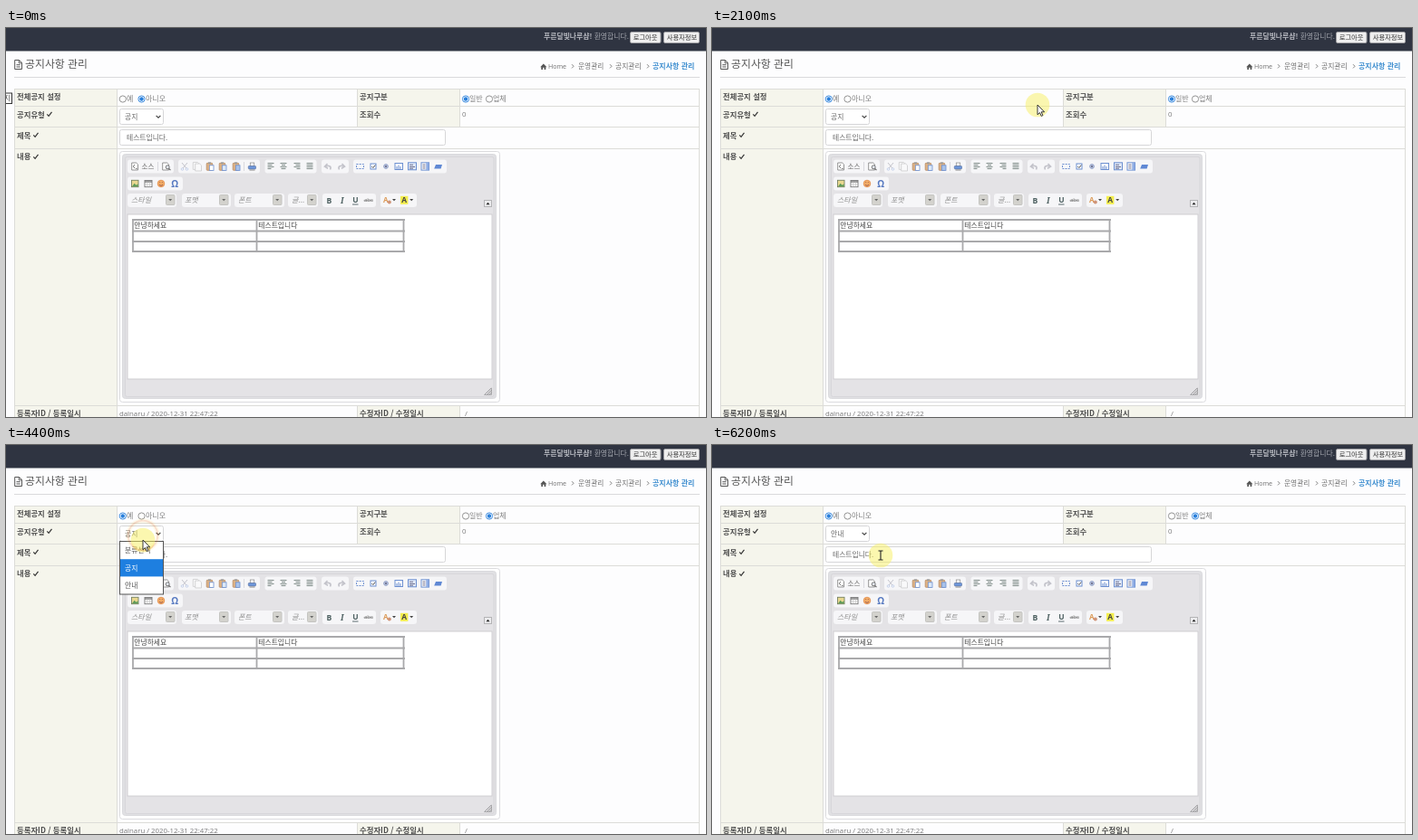
Animation, 772 px wide and 430 px high, one loop 8 s. Source, as an HTML page:

```html
<!DOCTYPE html>
<html lang="ko">
<head>
<meta charset="utf-8">
<style>
html, body { margin: 0; width: 100%; height: 100%; overflow: hidden; background: #fdfdfe; }
svg { display: block; width: 772px; height: 430px; font-family: "Noto Sans CJK KR", "Noto Sans CJK", sans-serif; }
.latin { font-family: "Open Sans", "Noto Sans CJK KR", sans-serif; }
</style>
</head>
<body>
<svg id="stage" viewBox="0 0 772 430"></svg>
<script>
const LOOP = 8000;
let out = '';

const rect = (x, y, w, h, fill = 'none', stroke = 'none', r = 0, sw = 1) =>
  out += `<rect x="${x}" y="${y}" width="${w}" height="${h}" rx="${r}" fill="${fill}" stroke="${stroke}" stroke-width="${sw}"/>`;
const path = (d, stroke, w = 1, fill = 'none', extra = '') =>
  out += `<path d="${d}" stroke="${stroke}" stroke-width="${w}" fill="${fill}" ${extra}/>`;
const circle = (x, y, r, fill, stroke = 'none', w = 1, extra = '') =>
  out += `<circle cx="${x}" cy="${y}" r="${r}" fill="${fill}" stroke="${stroke}" stroke-width="${w}" ${extra}/>`;
// y is the vertical middle of the glyphs
const text = (x, y, size, str, fill = '#707070', extra = '') =>
  out += `<text x="${x}" y="${y + size * 0.38}" font-size="${size}" fill="${fill}" ${extra}>${str}</text>`;
const BOLD = 'font-weight="700"', LATIN = 'class="latin"';
const group = (attrs, draw) => { out += `<g ${attrs}>`; draw(); out += '</g>'; };

function header() {
  rect(0, 0, 772, 25.5, '#2f3441');
  text(593, 9.5, 7.85, '<tspan font-weight="700" fill="#b9bbc2">푸른달빛나루샵!</tspan> 환영합니다.', '#a2a5ad');
  for (const [x, w, s] of [[688.5, 33.5, '로그아웃'], [725.5, 39, '사용자정보']]) {
    rect(x, 4.5, w, 12, '#efefef', '#a0a0a4', 1.5);
    text(x + 3.2, 10.5, 7.3, s, '#333');
  }
  path('M9.7 35.5H14.5L17.5 38.5V45.5H9.7ZM14.3 35.7V38.8H17.3M11.5 40.7H15.7M11.5 43H15.7', '#555', 1);
  text(21, 39.3, 11.9, '공지사항 관리', '#555');
  path('M9 54.5H765', '#dadadc');
  path('M589.2 43.2L592.8 39.6 596.4 43.2H595.3V46H593.6V43.8H592V46H590.3V43.2Z', 'none', 0, '#555');
  text(598, 42.3, 7.1, 'Home', '#707070', LATIN);
  text(631, 42.3, 7.7, '운영관리');
  text(672, 42.3, 7.8, '공지관리');
  text(713, 42.2, 8, '공지사항 관리', '#3f8fd0', BOLD);
  for (const x of [624, 666, 707]) path(`M${x} 40.2l2 2.1-2 2.1`, '#777', 0.9);
}

function form() {
  const label = '#f5f5ec';
  rect(9.5, 67, 113, 363, label);
  rect(388, 67, 113, 42, label);
  rect(388, 417.5, 113, 13, label);
  path('M9 67.5H765M9 86.5H765M9 109.5H765M9 133.5H765M9 417.5H765M9.5 67V430M122.5 67V430' +
    'M764.5 67V430M387.5 67V109M500.5 67V109M387.5 417V430M500.5 417V430', '#dcdcd8');
  const labels = [[12, 76, '전체공지 설정'], [12, 95.5, '공지유형'], [12, 118.5, '제목'], [12, 142, '내용'],
    [12, 426, '등록자ID / 등록일시'], [390, 76, '공지구분'], [390, 95.5, '조회수'], [390, 426, '수정자ID / 수정일시']];
  for (const [x, y, s] of labels) text(x, y, 8.4, s, '#505050', BOLD);
  for (const [x, y] of [[45.3, 95.3], [30.3, 118.3], [30.3, 142.3]]) path(`M${x} ${y}l1.8 2 3.4-4.4`, '#333', 1.2);
  text(503, 95.5, 7.8, '0', '#777', LATIN);
  text(125, 426, 7.8, 'dalnaru / 2020-12-31 22:47:22', '#777', LATIN);
  text(506, 426, 7.8, '/', '#777', LATIN);
  for (const [x, s] of [[133, '예'], [154, '아니오'], [511, '일반'], [537, '업체']]) text(x, 77.8, 8, s, '#808080');
  rect(125.5, 89.5, 48, 17, '#fff', '#d6d6d8', 2);
  path('M165.6 96.8l2.4 2.4 2.4-2.4', '#444', 1.2);
  rect(125.5, 112.5, 359, 17, '#fff', '#d6d6d8', 2);
  text(133, 121, 7.8, '테스트입니다.', '#666');
}

const page = (x, y, c = '#888') => path(`M${x - 3.3} ${y - 4}h5l1.8 1.8v6.2h-6.8z`, c, 0.9, '#fff');
const lines = (x, y, widths, shift) =>
  widths.forEach((w, i) => path(`M${x - 3.5 + (7 - w) * shift} ${y - 3.5 + i * 2}h${w}`, '#84908c', 1.1));
const arrowDown = (x, y, c = '#444') => path(`M${x - 2} ${y - 1}h4l-2 2.3z`, 'none', 0, c);

function icons() {
  const y = 153, blue = '#6c8fd0';
  page(142, y);
  path('M142 151l-1.7 2 1.7 2M143 155.5h1.5', '#666', 0.9);
  text(149.5, y, 7.5, '소스', '#666');
  path('M167.5 148V158M262.5 148V158', '#d9d9de');
  page(176, y);
  circle(178.2, 153.8, 2, '#e8eef8', '#666', 0.9);
  path('M179.7 155.3l1.8 1.8', '#666', 1.1);

  group('opacity=".35"', () => {
    path('M194 149l5 6M200 149l-5 6', '#667', 1);
    circle(194.5, 156, 1.3, 'none', blue);
    circle(199.5, 156, 1.3, 'none', blue);
    page(209.6, 152.4);
    page(212, 154);
    path('M357.5 156.5c2-4-2-5-5-3.6M354.5 150l-3 3 3.5 2.2', '#667', 1.6);
    path('M367.5 156.5c-2-4 2-5 5-3.6M370.5 150l3 3-3.5 2.2', '#667', 1.6);
  });
  for (const [x, c] of [[225, '#fff'], [239, '#dce9f8'], [254, '#a9c3ea']]) {
    rect(x - 3.8, 149.3, 6.5, 8, '#dfb283', '#b58c66', 0.8, 0.8);
    rect(x - 2, 148.4, 3, 1.8, '#999');
    rect(x - 0.7, 151.8, 4.7, 5.6, c, blue, 0, 0.8);
  }
  rect(269.3, 149, 4.4, 4, '#fff', '#888', 0, 0.7);
  rect(267.3, 152.5, 8.2, 3.4, '#6d96da', '#6077a5', 0.8, 0.7);
  path('M268.5 157h6', '#888', 1);
  lines(292, y, [7, 5, 7, 4], 0);
  lines(306, y, [7, 4, 7, 5], 0.5);
  lines(321, y, [7, 5, 7, 4], 1);
  lines(335, y, [7, 7, 7, 7], 0);

  path('M386.5 150.5h8v5h-8z', blue, 1, 'none', 'stroke-dasharray="2 1.2"');
  rect(402, 150, 6, 6, '#fff', blue);
  path('M403.3 153l1.5 1.5 2.5-3', '#444', 0.9);
  circle(419, y, 2.4, '#b9c5de', '#8f9ec4', 0.9);
  circle(419, y, 0.9, '#557');
  rect(429, 149.5, 8.5, 7, '#fff', blue);
  path('M431 156v-3M433 156v-4.5M435 156v-3', blue, 1);
  rect(443.5, 148.8, 9, 8, '#dfe8f8', blue);
  path('M445 151.3h4M445 153.5h6M445 155.3h4', '#557', 0.8);
  rect(458, 148.8, 8.5, 8.3, '#fff', blue);
  path('M459.5 151h3M459.5 153h3M459.5 155h3', '#557', 0.8);
  rect(463.3, 149, 3, 8, '#8fadE4');
  path('M474 151h7l-1.4 4.6h-7.4z', 'none', 0, '#5f88d4');

  rect(138.5, 168.3, 7.5, 7.4, '#e9d890', '#75815f', 0, 0.9);
  path('M139 175.3l2.6-3.6 2 2 2-1.4v3z', 'none', 0, '#5c9a58');
  rect(153, 168.5, 8, 7.2, '#fff', '#777', 0, 0.9);
  path('M153 170h8', '#777', 1.4);
  path('M153 173h8M155.7 170v5.5M158.4 170v5.5', '#bbb', 0.6);
  circle(171, 172, 3.8, '#f5b068', '#e08a4a', 0.8);
  path('M169 173c1 1.7 3 1.7 4 0M169.7 170.3v1M172.3 170.3v1', '#844', 0.8);
  text(182.2, 172, 10, 'Ω', '#5578c0', BOLD + ' ' + LATIN);

  text(353.4, 190.3, 8.6, 'B', '#4c5f60', BOLD + ' ' + LATIN);
  text(369, 190.3, 8.6, 'I', '#4c5f60', BOLD + ' font-style="italic" style="font-family:Noto Serif,serif"');
  text(382.2, 189.8, 8.4, 'U', '#4c5f60', BOLD + ' ' + LATIN);
  path('M382 195h6.5', '#4c5f60', 0.9);
  text(395, 190, 6, 'abc', '#777', LATIN);
  path('M394.5 190.8h10.5', '#777', 0.7);
  text(416, 189.5, 8, 'A', '#dc9a58', BOLD + ' ' + LATIN);
  circle(422.8, 192.6, 2, '#d09478');
  arrowDown(428, 190);
  rect(435, 185.8, 8.4, 9, '#f4ee4c');
  text(436.3, 190.2, 8.4, 'A', '#444', BOLD + ' ' + LATIN);
  arrowDown(447.2, 190);
}

function editor() {
  rect(125.5, 136.5, 419, 277, '#fff', '#dbdbde', 3);
  rect(128.5, 139.5, 412, 270, '#e0e0e3', '#dadadd', 3);
  rect(131.5, 142.5, 406.5, 265, '#e4e3e6', '#d7d6da', 2);
  const pills = [[134, 145.5, 51], [190, 145.5, 90], [285.5, 145.5, 57], [348, 145.5, 30], [383, 145.5, 103],
    [134, 164.5, 61], [134, 183, 54], [194, 183, 54], [252, 183, 55], [311, 183, 33], [349, 183, 59], [413, 183, 40]];
  for (const [x, y, w] of pills) rect(x, y, w, 15, '#f6f6f8', 'none', 3);
  out += '<rect id="hover" x="136" y="147" width="31" height="12" rx="2" fill="#d3e3f6"/>';
  icons();
  for (const [x, s, b] of [[138, '스타일', 176], [197, '포맷', 235], [256, '폰트', 294], [315, '글...', 332]]) {
    text(x, 190, 8, s, '#8f8f8f', 'font-style="italic"');
    rect(b + 0.5, 184.5, 9.5, 11, '#d3d2cd', '#c4c4c1', 1);
    arrowDown(b + 5.2, 190, '#666');
  }
  rect(527.5, 190.5, 8, 7, '#ececee', '#b4b4b6');
  path('M529.5 195.3h4l-2-2.5z', 'none', 0, '#222');
  rect(134, 206, 402, 182, '#fff', '#cfced2');
  path('M535.5 398v7.5h-8zM528 405l7-7', '#a0a0a2', 0.8);
  path('M530.5 405.3l5-5M533 405.3l2.5-2.5', '#888', 0.9);
  path('M139 212H440M139 224.5H440M139 236H440M139 247H440M140 211V248M276.5 211V248M438.5 211V248', '#a9a9ab', 1.8);
  text(141.3, 218, 7.8, '안녕하세요', '#444');
  text(278.3, 218, 7.8, '테스트입니다', '#444');
}

header();
form();
editor();
out += '<g id="live"></g>';
const stage = document.getElementById('stage');
stage.innerHTML = out;
const live = document.getElementById('live'), hover = document.getElementById('hover');

// time, x, y of the pointer
const route = [[0, -60, 70], [199, -60, 70], [200, 6, 70], [900, 129, 79], [1600, 129, 79], [1900, 255, 88],
  [2300, 463, 82], [2700, 540, 78], [3000, 538, 79], [3300, 535, 79], [3500, 523, 81], [3700, 330, 98],
  [3900, 151, 100], [4200, 151, 101], [4400, 151, 105], [4700, 139, 157], [5200, 139, 157], [5300, 141, 155],
  [5400, 70, 115], [5500, 26, 92], [5600, 260, 88], [5700, 523, 90], [5800, 340, 108], [5900, 180, 124],
  [6200, 186, 122], [LOOP, 186, 122]];
// press, release, x, y
const clicks = [[1100, 1500, 129, 79], [2900, 3000, 537, 79], [3900, 4000, 151, 100], [4700, 4900, 139, 157]];

function pointer(t) {
  const i = Math.max(1, route.findIndex(k => k[0] > t));
  const [t0, x0, y0] = route[i - 1], [t1, x1, y1] = route[i];
  const u = (t - t0) / (t1 - t0);
  return [x0 + (x1 - x0) * u, y0 + (y1 - y0) * u];
}

function radio(x, on) {
  circle(x, 78.5, 3.6, '#fff', on ? '#2a80dc' : '#888', 0.9);
  if (on) circle(x, 78.5, 2.2, '#2a80dc');
}

function dropdown(y) {
  rect(125.5, 106.5, 48, 58.5, '#fff', '#555');
  const active = y < 107 ? 1 : Math.min(2, Math.floor((y - 107) / 19.3));
  ['분류선택', '공지', '안내'].forEach((s, i) => {
    if (i === active) rect(126, 107 + i * 19.2, 47, 19.2, '#1e7fe0');
    text(131, 116.5 + i * 19.2, 7.8, s, i === active ? '#fff' : '#555');
  });
}

function ring(t, [press, release, x, y]) {
  const u = Math.max(0, (t - release) / 600);
  if (t < press || u >= 1) return;
  const alpha = t === press ? 0.6 : (1 - u) ** 1.3, r = 9 + 11 * u;
  group(`opacity="${alpha}"`, () => {
    circle(x, y, r, 'none', '#ffd75e', 5, 'stroke-opacity=".5"');
    circle(x, y, r, 'none', '#e8772e', 1.8);
  });
}

function draw(now) {
  const t = Math.floor(now % LOOP / 100) * 100;
  const [x, y] = pointer(t);
  const open = t >= 4200 && t < 5000;
  out = '';
  if (t < 200) {
    rect(-10, 72, 16.5, 11.5, '#fff', '#333');
    text(-2, 77.7, 7.2, '지', '#444');
  }
  radio(128.8, t >= 1200);
  radio(149.5, t < 1200);
  radio(507, t < 3000);
  radio(533, t >= 3000);
  text(131, 98, 7.8, t < 5000 ? '공지' : '안내', '#666');
  if (open) dropdown(y);
  hover.style.display = !open && x > 135 && x < 168 && y > 146 && y < 160 ? '' : 'none';

  circle(x, y, 13.3, '#f8f060', 'none', 0, 'opacity=".5"');
  clicks.forEach(c => ring(t, c));
  const overText = (x > 510 && x < 526 && y < 85) || (x > 126 && x < 485 && y > 112 && y < 130 && !open);
  group(`transform="translate(${x} ${y})"`, () => overText
    ? path('M-2.5-5H-.6L0-4.5.6-5H2.5M0-4.5V4.5M-2.5 5H-.6L0 4.5.6 5H2.5', '#222', 1.1)
    : path('M0 0V10.8L2.5 8.5 4.2 12.4 5.9 11.6 4.2 7.8H7.6Z', '#222', 0.9, '#fff'));
  live.innerHTML = out;
}

function tick() {
  draw(performance.now());
  requestAnimationFrame(tick);
}
tick();
</script>
</body>
</html>
```
